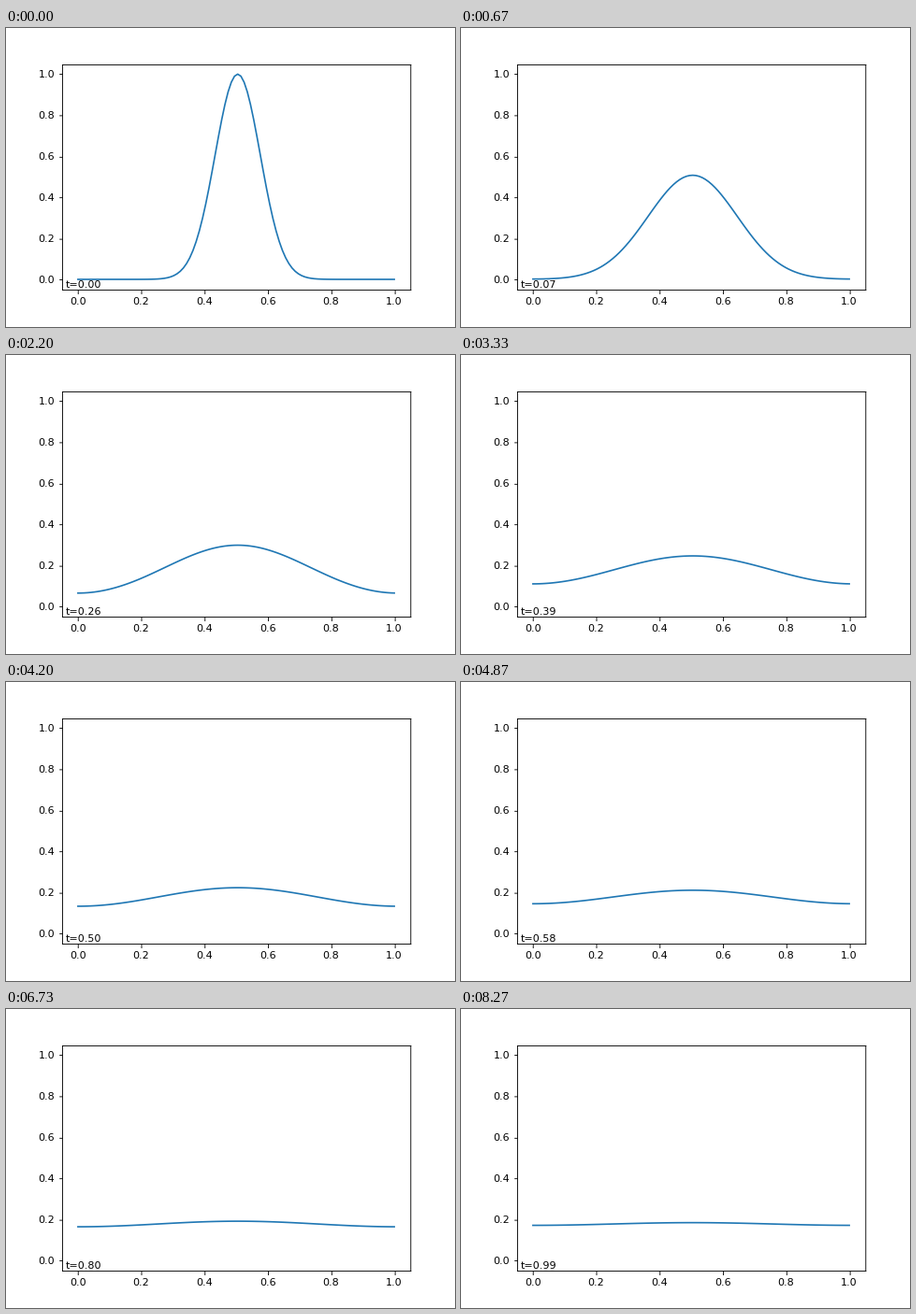
Write a matplotlib script that moves like this. It is 480 by 320 pixels and loops after 8.39 s.

```python
import numpy as np
import matplotlib.pyplot as plt
from matplotlib.animation import FuncAnimation
from matplotlib.transforms import Affine2D

LOOP_MS = 8390
FRAMES = 126
POINTS = 100
STEPS = 500
STRIDE = 4
DIFFUSIVITY = 0.1
DPI = 80
WIDTH, HEIGHT = 432, 288  # stage in points
LEFT, RIGHT, BOTTOM, TOP = 0.125, 0.9, 0.125, 0.88
LIMITS = (-0.05, 1.05)

plt.rcParams["font.family"] = "DejaVu Sans"

x = np.linspace(0, 1, POINTS)
times = np.linspace(0, 1, STEPS)

# Gaussian pulse on a periodic grid, diffused in Fourier space
cells = np.arange(POINTS) / POINTS
pulse = np.fft.rfft(np.exp(-((cells - 0.5) / 0.1) ** 2))
wave = 2 * np.pi * np.arange(pulse.size)


def heat(t):
    return np.fft.irfft(pulse * np.exp(-DIFFUSIVITY * wave**2 * t), POINTS)


fig, ax = plt.subplots(figsize=(WIDTH / 72, HEIGHT / 72), dpi=DPI,
                       facecolor="white")
fig.subplots_adjust(left=LEFT, right=RIGHT, bottom=BOTTOM, top=TOP)
ticks = np.linspace(0, 1, 6)
ax.set(xlim=LIMITS, ylim=LIMITS, xticks=ticks, yticks=ticks)
ax.spines[:].set_visible(False)
ax.tick_params(length=0, pad=7)

# Frame and ticks sit on whole points, measured from the top left
scale = DPI / 72
points = Affine2D().scale(scale, -scale).translate(0, HEIGHT * scale)


def rule(xs, ys, cap):
    xs, ys = (np.floor(np.array(v) + 0.5) + 0.5 for v in (xs, ys))
    ax.plot(xs, ys, color="black", lw=0.8, transform=points, snap=False,
            clip_on=False, zorder=2.5, solid_capstyle=cap,
            scalex=False, scaley=False)


x0, x1 = LEFT * WIDTH, RIGHT * WIDTH
y0, y1 = (1 - BOTTOM) * HEIGHT, (1 - TOP) * HEIGHT
for y in (y0, y1):
    rule((x0, x1), (y, y), "projecting")
for side in (x0, x1):
    rule((side, side), (y0, y1), "projecting")
for f in (ticks - LIMITS[0]) / (LIMITS[1] - LIMITS[0]):
    tx, ty = x0 + f * (x1 - x0), y0 + f * (y1 - y0)
    rule((tx, tx), (y0, y0 + 3.5), "butt")
    rule((x0, x0 - 3.5), (ty, ty), "butt")

line, = ax.plot(x, heat(0), color="#1f77b4", lw=1.5)
label = ax.text(-0.04, -0.04, "t=0.00", fontsize=10)


def update(i):
    # the opening pose is held for two frames
    t = times[max(i - 1, 0) * STRIDE]
    line.set_ydata(heat(t))
    label.set_text(f"t={t:.2f}")
    return line, label


anim = FuncAnimation(fig, update, frames=FRAMES, interval=LOOP_MS / FRAMES,
                     init_func=lambda: update(0), repeat=True,
                     repeat_delay=0, blit=False)
plt.show()
```
